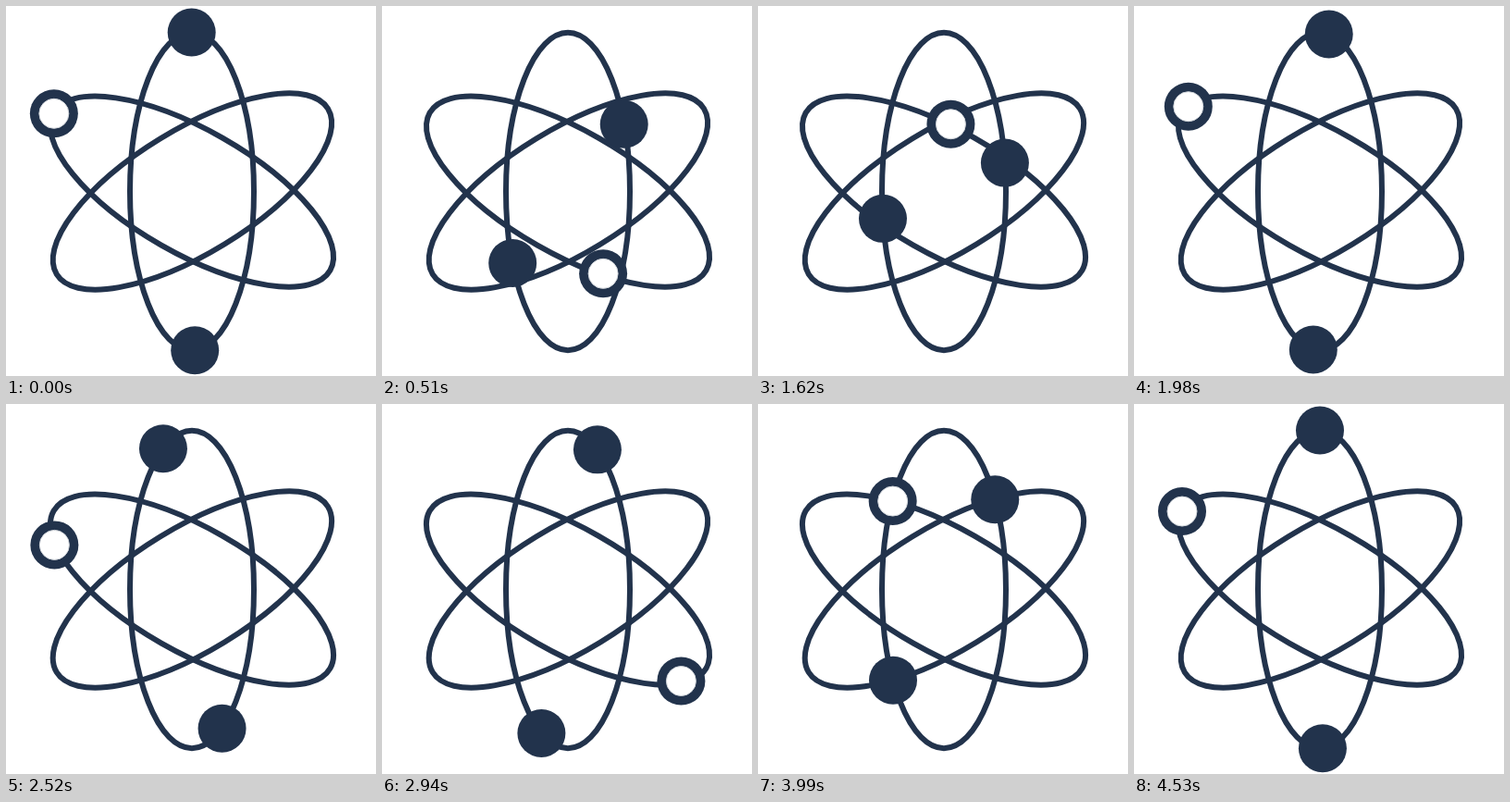
Animation of 400 by 400 pixels, one loop 4.56 s. Source, as an HTML page:

```html
<!DOCTYPE html>
<html lang="en">
<head>
<meta charset="utf-8">
<title>Atom</title>
<style>
  html, body { margin: 0; width: 100%; height: 100%; overflow: hidden; background: #fff; }
  svg { display: block; width: 100vw; height: 100vh; }
</style>
</head>
<body>
<svg viewBox="0 0 400 400">
  <g fill="none" stroke="#22334c" stroke-width="6">
    <ellipse cx="201" cy="200.5" rx="67" ry="171.7"/>
    <ellipse cx="201" cy="200.6" rx="172" ry="66.8" transform="rotate(29.67 201 200.6)"/>
    <ellipse cx="201.4" cy="200.5" rx="171.8" ry="66.8" transform="rotate(-31.4 201.4 200.5)"/>
  </g>
  <g fill="#22334c">
    <circle id="ballA" r="26"/>
    <circle id="ballB" r="26"/>
    <g id="ring">
      <circle r="26"/>
      <circle r="16" fill="#fff" stroke="#d3d7dc" stroke-width="1"/>
    </g>
  </g>
</svg>
<script>
  const LOOP = 2280, HALF = 1140, MOVE = 1050, LEAD = 30, STEP = 30;
  const RAD = Math.PI / 180;

  // Cubic Bezier easing with handles (p, 0) and (c, 1)
  function ease(x, p, c) {
    if (x <= 0) return 0;
    if (x >= 1) return 1;
    let lo = 0, hi = 1;
    for (let i = 0; i < 30; i++) {
      const s = (lo + hi) / 2, r = 1 - s;
      if (3 * r * r * s * p + 3 * r * s * s * c + s * s * s < x) lo = s;
      else hi = s;
    }
    return lo * lo * (3 - 2 * lo);
  }

  const upright = { cx: 201, cy: 200.5, a: 171.9, b: 67, tilt: -90 };
  const slanted = { cx: 201.5, cy: 199.8, a: 171.4, b: 67.5, tilt: 28.67 };

  // Each body turns from start through mid to a full turn, anticlockwise
  const bodies = [
    { id: "ballA", orbit: upright, start: 0, mid: -183 },
    { id: "ballB", orbit: upright, start: 177.5, mid: 1.2 },
    { id: "ring", orbit: slanted, start: 181.5, mid: -3.1 }
  ];
  for (const body of bodies) body.el = document.getElementById(body.id);

  function place({ el, orbit, start, mid }, first, second) {
    const angle = (start + (mid - start) * first + (start - 360 - mid) * second) * RAD;
    const tilt = orbit.tilt * RAD;
    const u = orbit.a * Math.cos(angle), v = orbit.b * Math.sin(angle);
    const x = orbit.cx + u * Math.cos(tilt) - v * Math.sin(tilt);
    const y = orbit.cy + u * Math.sin(tilt) + v * Math.cos(tilt);
    el.setAttribute("transform", `translate(${x.toFixed(2)} ${y.toFixed(2)})`);
  }

  function draw(ms) {
    const t = (Math.floor(ms / STEP) * STEP + LEAD) % LOOP;
    const first = ease(t / MOVE, 0.447, 0.405);
    const second = ease((t - HALF) / MOVE, 0.355, 0.528);
    for (const body of bodies) place(body, first, second);
  }

  let origin = null;
  function tick(now) {
    if (origin === null) origin = now;
    draw(Math.max(0, now - origin));
    requestAnimationFrame(tick);
  }
  draw(0);
  requestAnimationFrame(tick);
</script>
</body>
</html>
```
